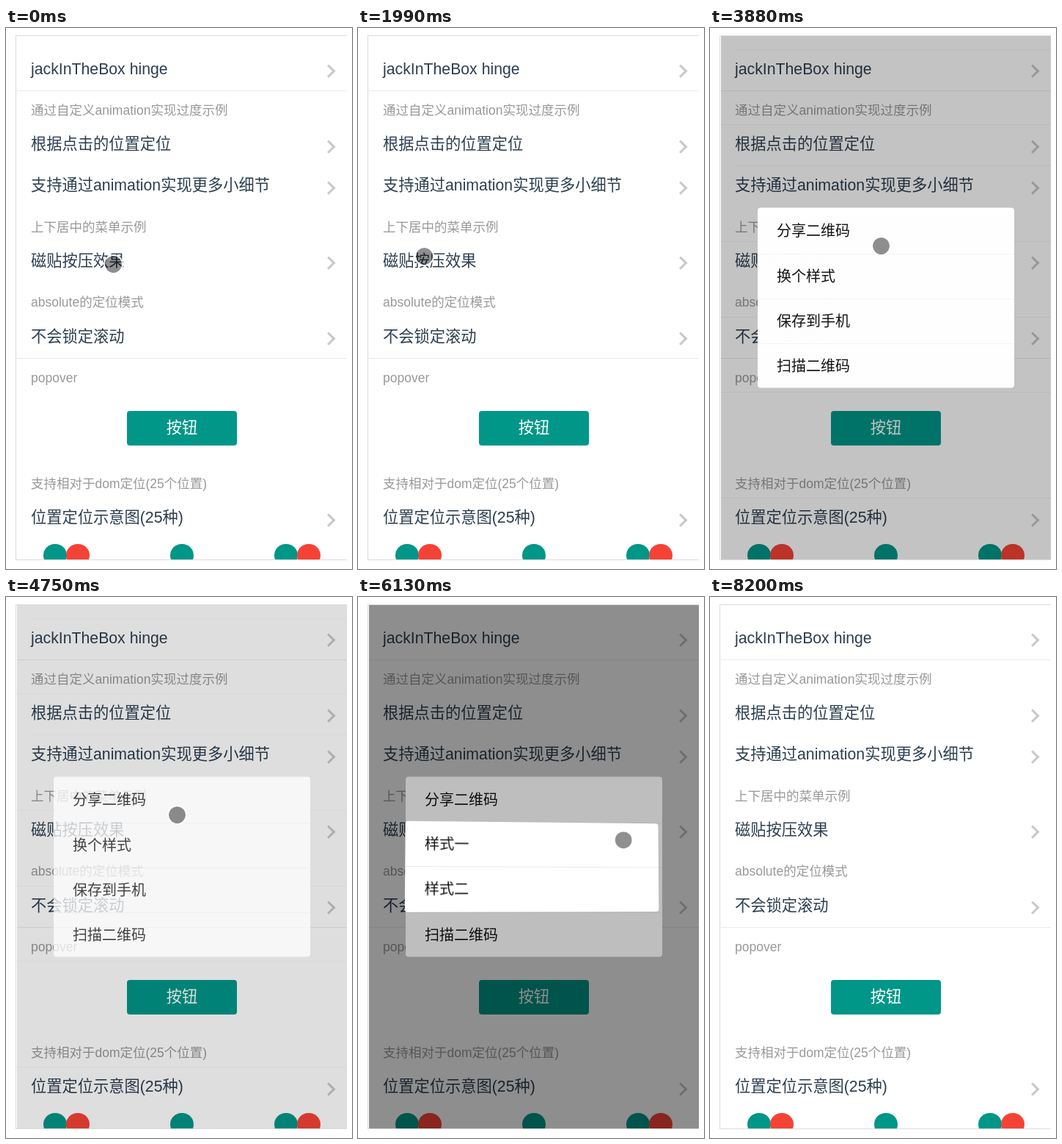
Write an HTML page that moves like this. It is 472 px wide and 736 px high and loops after 8.54 s.

```html
<!DOCTYPE html>
<html lang="zh-CN">
<head>
<meta charset="utf-8">
<style>
* { box-sizing: border-box; }
html, body { margin: 0; width: 100%; height: 100%; overflow: hidden; background: #fff; }
body { font: 350 21.25px "Liberation Sans", Arial, "Noto Sans CJK SC", "Noto Sans CJK", sans-serif; white-space: nowrap; }
#frame { position: absolute; left: 13px; top: 10px; width: 452px; height: 714px; border: 1px solid #dcdcdc; border-right: 0; }
#page, .shade { position: absolute; left: 15px; top: 11px; width: 450px; height: 712px; }
#page { overflow: hidden; padding-top: 17.6px; --faint: 0; }
.row, .head, .tool { position: relative; padding-left: 19px; }
.row { height: 56.25px; line-height: 55px; color: #2c3e50; }
.head { height: 46.33px; line-height: 54px; font-size: 17.5px; color: #999; }
.tool { height: 98px; padding: 25.6px 0 0 150px; }
.row::before, .tool::before { content: ""; position: absolute; left: 0; right: 0; top: 0; height: 1px; background: #f0f0f0; opacity: var(--faint); }
.row:first-child::before, .row + .row::before { left: 18px; }
.line { box-shadow: inset 0 1px #eaeaea; }
.row::after { content: ""; position: absolute; left: 419px; top: 23.4px; width: 9.5px; height: 9.5px;
  border: solid #c7c7cc; border-width: 3px 3px 0 0; transform: rotate(45deg); }
.row:last-of-type::after { display: none; }
.button { width: 150px; height: 47px; line-height: 46px; border-radius: 4px; background: #009688; color: #fff; text-align: center; }
.dot { position: absolute; top: 690.5px; width: 31.5px; height: 31.5px; border-radius: 50%; background: #009688; }
.red { background: #f44336; }
.shade { background: rgba(0,0,0,.253); }
.menu { position: absolute; left: 65px; top: 367.3px; width: 350px; margin: 0; border-radius: 4px; overflow: hidden; background: #fff; font-size: 20px; color: #111; }
.item { height: 61.25px; line-height: 63.5px; padding-left: 26px; }
.item + .item { box-shadow: inset 0 1px #e9e9e9; }
#cursor { position: absolute; left: -13.5px; top: -13.5px; width: 27px; height: 27px; border-radius: 50%;
  background: rgba(0,0,0,.44) padding-box; border: 2px solid rgba(255,255,255,.9); }
</style>
</head>
<body>
<div id="frame"></div>
<div id="page">
  <div class="row">jackInTheBox hinge</div>
  <div class="head line">通过自定义animation实现过度示例</div>
  <div class="row">根据点击的位置定位</div>
  <div class="row">支持通过animation实现更多小细节</div>
  <div class="head">上下居中的菜单示例</div>
  <div class="row">磁贴按压效果</div>
  <div class="head">absolute的定位模式</div>
  <div class="row">不会锁定滚动</div>
  <div class="head line">popover</div>
  <div class="tool"><div class="button">按钮</div></div>
  <div class="head">支持相对于dom定位(25个位置)</div>
  <div class="row">位置定位示意图(25种)</div>
</div>
<script>
const LOOP = 8540;
const page = document.getElementById('page');

function add(parent, cls, text = '') {
  const el = document.createElement('div');
  el.className = cls;
  el.textContent = text;
  parent.append(el);
  return el;
}

// Dots mirrored around the middle column
for (const x of [-173, -142, 0, 142, 173]) {
  add(page, x === -142 || x === 173 ? 'dot red' : 'dot').style.left = `${209.25 + x}px`;
}

// A span is [on, off]: the value eases to 1 after on and back to 0 after off
const ease = u => (u = Math.min(1, Math.max(0, u)), u * u * (3 - 2 * u));
const level = (spans, t, ms) =>
  spans.reduce((sum, [on, off]) => sum + ease((t - on) / ms) - ease((t - off) / ms), 0);

const menus = [
  { items: ['分享二维码', '换个样式', '保存到手机', '扫描二维码'],
    shown: [[950, 1520], [2160, 3830], [4600, 7750]],
    pressed: [[1250, 1340], [2460, 3670], [5080, 5440]] },
  { items: ['样式一', '样式二'], shown: [[5590, 7450]], pressed: [[6000, 7270]] }
];
for (const menu of menus) {
  menu.shade = add(document.body, 'shade');
  menu.box = add(document.body, 'menu');
  menu.items.forEach(text => add(menu.box, 'item', text));
}
const cursor = add(document.body, '');
cursor.id = 'cursor';

// Cursor moves: start, end, x, y
const moves = [
  [480, 700, 101, 323], [1250, 1500, 90, 310], [2300, 2690, 110, 263],
  [3180, 3480, 233, 296], [5080, 5480, 382, 291], [5560, 5900, 382, 325],
  [6000, 6790, 105, 395], [6910, 7140, 386, 333], [7780, 8170, 387, 752]
];

function pose(menu, t, x, y) {
  const open = level(menu.shown, t, 300), press = level(menu.pressed, t, 180);
  menu.shade.style.opacity = open;
  menu.box.style.opacity = 1 - (1 - open) ** 2;
  // Tilt away from the viewer at the pressed spot
  const rx = press * (367 - y) / 12.2, ry = press * (x - 240) / 17.9;
  menu.box.style.transform = `translateY(-50%) scale(${1 - press / 100})`
    + (press ? ` perspective(1000px) rotateX(${rx}deg) rotateY(${ry}deg)` : '');
  return open;
}

function draw() {
  const t = performance.now() % LOOP;
  let x = 146, y = 321;
  for (const [from, to, tx, ty] of moves) {
    const s = ease((t - from) / (to - from));
    x += (tx - x) * s;
    y += (ty - y) * s;
  }
  const [first, second] = menus.map(menu => pose(menu, t, x, y));
  page.style.setProperty('--faint', first * (1 - second));
  cursor.style.transform = `translate(${x}px, ${y}px)`;
  requestAnimationFrame(draw);
}
draw();
</script>
</body>
</html>
```
